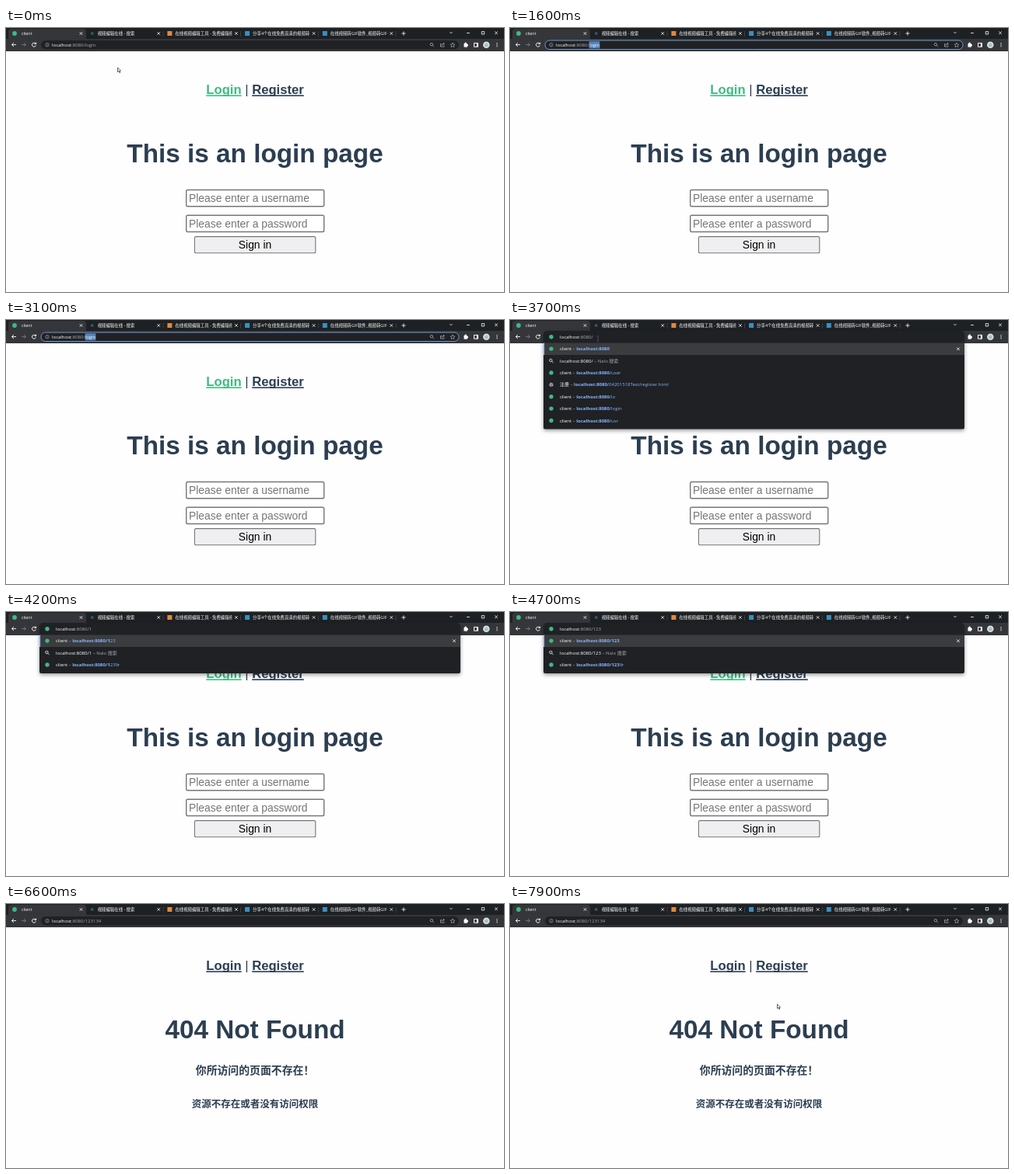
These frames come from a looping animation (640x340 px, 8000 ms). An HTML page with a canvas:

```html
<!DOCTYPE html>
<html lang="en">
<head>
<meta charset="utf-8">
<title>Login page</title>
<style>
  html, body { margin: 0; width: 100%; height: 100%; overflow: hidden; background: #fefefe; }
  canvas { display: block; width: 100vw; height: 100vh; }
</style>
</head>
<body>
<canvas id="stage"></canvas>
<script>
const LOOP = 8000, W = 640, H = 340;
const FOCUS = 1200, SELECT = 1400, OPEN = 3700, ENTER = 6400;
const INK = '#2c3e50', GREEN = '#42b983', BLUE = '#86b6fc', LIGHT = '#fff', GRAY = '#a4aab0';
const BAR = '#35363a', DARK = '#202124';
const UI = '"Open Sans", "Noto Sans CJK SC", sans-serif';
const ARIAL = '"Liberation Sans", Arial, sans-serif';
const CJK = '"Noto Sans CJK SC", sans-serif';
const HOST = 'localhost', PORT = ':8080/';

const canvas = document.getElementById('stage');
const ctx = canvas.getContext('2d');
const ratio = window.devicePixelRatio || 1;
canvas.width = W * ratio;
canvas.height = H * ratio;
ctx.scale(ratio, ratio);

// Draws text and returns the x where it ends.
function text(str, x, y, font, color, align = 'left') {
  ctx.font = font;
  ctx.fillStyle = color;
  ctx.textAlign = align;
  ctx.fillText(str, x, y);
  return x + ctx.measureText(str).width;
}
const ui = (str, x, y, color = LIGHT, bold = false) =>
  text(str, x, y, `${bold ? 'bold ' : ''}6px ${UI}`, color);

function rect(x, y, w, h, color) {
  ctx.fillStyle = color;
  ctx.fillRect(x, y, w, h);
}

function box(x, y, w, h, r, fill, stroke, width = 1) {
  ctx.beginPath();
  ctx.roundRect(x, y, w, h, r);
  if (fill) { ctx.fillStyle = fill; ctx.fill(); }
  if (stroke) { ctx.strokeStyle = stroke; ctx.lineWidth = width; ctx.stroke(); }
}

const disc = (x, y, r, fill, stroke, width = 0.8) =>
  box(x - r, y - r, 2 * r, 2 * r, r, fill, stroke, width);

// Strokes an SVG path placed at x, y.
function icon(d, x, y, color = LIGHT, width = 0.8) {
  ctx.save();
  ctx.translate(x, y);
  ctx.strokeStyle = color;
  ctx.lineWidth = width;
  ctx.stroke(new Path2D(d));
  ctx.restore();
}
const cross = (x, y, r = 1.8) => icon(`M${-r} ${-r}L${r} ${r}M${r} ${-r}L${-r} ${r}`, x, y);

function magnifier(x, y, color = LIGHT) {
  disc(x - 0.6, y - 0.6, 1.7, null, color);
  icon('M.7 .7L2.6 2.6', x, y, color);
}

function globe(x, y) {
  disc(x, y, 2.5, '#b4b8bc');
  icon('M-2 -.8L.5 .4L-.3 2M.5 -2L1.8 0', x, y, DARK, 0.7);
}

const favicons = {
  app: (x, y) => disc(x, y, 2.7, '#41b883'),
  search: magnifier,
  globe
};

function drawTabs() {
  rect(0, 0, W, 14, '#1e2124');
  box(3, 1, 100, 15, [4, 4, 0, 0], BAR);
  const tabs = [
    ['client', '#41b883'],
    ['视频编辑在线 - 搜索', '#35556a'],
    ['在线视频编辑工具 - 免费编辑视频', '#e08a3c'],
    ['分享4个在线免费高清的视频转GIF在', '#3a8fc0'],
    ['在线视频转GIF软件_视频转GIF在线', '#3a8fc0']
  ];
  tabs.forEach(([title, color], i) => {
    const x = 11 + i * 99.7;
    if (i < 2) disc(x, 7, i ? 2 : 2.9, color);
    else rect(x - 3, 4, 6, 6, color);
    ctx.save();
    ctx.beginPath();
    ctx.rect(x + 6, 0, 74, 14);
    ctx.clip();
    text(title, x + (i ? 7 : 9), 9.2, `5.4px ${UI}`, LIGHT);
    ctx.restore();
    cross(x + 85.5, 7);
    if (i) rect(x + 91, 4, 0.6, 7, '#50545a');
  });
  icon('M-2.6 0H2.6M0 -2.6V2.6', 511, 7);
  icon('M-1.6 -.8L0 .8L1.6 -.8', 572, 6);
  icon('M-2 0H2', 594, 6.5);
  icon('M-1.7 -1.7H1.7V1.7H-1.7Z', 613, 6.3);
  cross(630, 6.3);
}

function drawToolbar() {
  rect(0, 14, W, 16, BAR);
  icon('M3 0H-2.6M0 -2.5L-2.6 0L0 2.5', 10, 21.5, LIGHT, 0.9);
  icon('M-3 0H2.6M0 -2.5L2.6 0L0 2.5', 23, 21.5, '#74787c', 0.9);
  icon('M2 -1.4A2.5 2.5 0 1 0 2.4 .9M2.6 -3V-.9H.5', 36, 21.5, LIGHT, 0.9);
  rect(588.5, 20, 4.4, 4.6, LIGHT);
  disc(590.6, 19.7, 1.2, LIGHT);
  disc(593, 22.2, 1.1, LIGHT);
  icon('M-2.5 -2.4H2.5V2.4H-2.5ZM1.3 -2.4V2.4', 604, 21.8, LIGHT, 1);
  disc(617.3, 21.7, 4.3, '#cfdde0');
  disc(617.3, 22, 2.2, '#a9bcb8');
  [-2, 0, 2].forEach(dy => disc(631, 21.7 + dy, 0.65, LIGHT));
}

function drawAddress(path, focused, selected) {
  box(45, 16, 537, 11.5, 5.75, DARK, focused ? '#78a6dd' : null, 0.9);
  disc(53, 21.7, 2.3, null, GRAY, 0.6);
  icon('M0 -.3V1.4M0 -1.4V-.8', 53, 21.7, GRAY, 0.7);
  let x = ui(HOST, 59, 23.8);
  x = ui(PORT, x, 23.8, GRAY);
  if (selected) {
    ctx.font = `6px ${UI}`;
    rect(x, 17.3, ctx.measureText(path).width, 9, '#5684bd');
  }
  ui(path, x, 23.8, selected ? LIGHT : GRAY);
  magnifier(547.5, 21.7, GRAY);
  icon('M-1 -1H-2.5V2.5H2V1M-1 1Q-.5 -1.2 2 -1.2M.8 -2.6L2.4 -1.2L.8 .2', 561, 21.5, GRAY);
  icon('M0 -3L.9 -.9L3 -.8L1.4 .6L1.9 2.7L0 1.5L-1.9 2.7L-1.4 .6L-3 -.8L-.9 -.9Z', 574, 21.9, GRAY, 0.7);
}

// Each row: icon, title, matched part of the address, remainder.
function suggestions(path) {
  const address = HOST + PORT + path;
  const search = ['search', address, '', ''];
  const base = HOST + ':8080';
  if (!path) return [
    ['app', 'client', base, ''],
    search,
    ['app', 'client', base, '/user'],
    ['globe', '注册', base, '/04201518Test/register.html'],
    ['app', 'client', base, '/lo'],
    ['app', 'client', base, '/login'],
    ['app', 'client', base, '/usr']
  ];
  if (path.length > 3) return [['globe', '', address, ''], search];
  return [
    ['app', 'client', address, '123'.slice(path.length)],
    search,
    ['app', 'client', address, '1239r'.slice(path.length)]
  ];
}

function drawDropdown(path) {
  const rows = suggestions(path), step = 15.4, unknown = path.length > 3;
  ctx.save();
  ctx.shadowColor = 'rgba(0,0,0,.4)';
  ctx.shadowBlur = 5 * ratio;
  ctx.shadowOffsetY = 2 * ratio;
  box(43, 14, 541, 18.8 + rows.length * step, [5, 5, 2, 2], DARK);
  ctx.restore();
  rect(43, 29.5, 541, 15.5, '#3a3c3e');
  rect(43, 29.5, 1.2, 15.5, BLUE);
  favicons[unknown ? 'globe' : 'app'](53, 21.7);
  ui(PORT + path, ui(HOST, 64, 23.8), 23.8, GRAY);
  if (!unknown) cross(576, 37.2);
  rows.forEach(([kind, title, match, rest], i) => {
    const y = 37.1 + i * step;
    favicons[kind](53, y);
    let x = ui(title, 64, y + 2.1);
    if (kind === 'search') ui(' – Nalo 搜索', x, y + 2.1, GRAY);
    else {
      if (title) x = ui(' – ', x, y + 2.1, GRAY);
      x = ui(match, x, y + 2.1, BLUE, true);
      ui(rest, x, y + 2.1, BLUE);
    }
  });
}

function drawNav(loginColor) {
  const bold = `bold 16.65px ${ARIAL}`;
  const link = (str, x, color) => {
    const end = text(str, x, 85, bold, color);
    rect(x, 86.3, end - x, 1.6, color);
    return end;
  };
  const x = link('Login', 257.3, loginColor);
  link('Register', text(' | ', x, 85, `16.65px ${ARIAL}`, INK), INK);
}

const heading = str => text(str, 320, 173, `bold 33.3px ${ARIAL}`, INK, 'center');

function drawLogin() {
  const font = `13.87px ${ARIAL}`;
  drawNav(GREEN);
  heading('This is an login page');
  ['username', 'password'].forEach((field, i) => {
    const y = 208.5 + i * 32.7;
    box(231.7, y, 177, 21.3, 1.8, '#fff', '#767676', 1.4);
    text('Please enter a ' + field, 235, y + 15.6, font, '#757575');
  });
  box(242.4, 268.6, 155.4, 21.2, 2, '#efeff1', '#767676', 1.1);
  text('Sign in', 320, 284, font, '#000', 'center');
}

function drawMissing() {
  drawNav(INK);
  heading('404 Not Found');
  text('你所访问的页面不存在！', 320, 218.6, `bold 13.87px ${CJK}`, INK, 'center');
  text('资源不存在或者没有访问权限', 320, 262.2, `bold 12.5px ${CJK}`, INK, 'center');
}

function drawPointer(x, y) {
  ctx.save();
  ctx.translate(x, y);
  const shape = new Path2D('M0 0V5.6L1.4 4.4L2.4 6.6L3.3 6.2L2.3 4.1H4Z');
  ctx.fillStyle = '#fff';
  ctx.fill(shape);
  ctx.strokeStyle = '#222';
  ctx.lineWidth = 0.7;
  ctx.stroke(shape);
  ctx.restore();
}

const beam = (x, y) => icon('M-1 -3H1M0 -3V3M-1 3H1', x, y, '#74787c', 0.5);

// Eased position between two points over a span of time.
function glide(t, start, end, [x0, y0], [x1, y1]) {
  const p = Math.min(1, Math.max(0, (t - start) / (end - start)));
  const k = p * p * (3 - 2 * p);
  return [x0 + (x1 - x0) * k, y0 + (y1 - y0) * k];
}

function drawMouse(t) {
  if (t < FOCUS) {
    const [x, y] = glide(t, 200, 1000, [143.5, 51], [117, 22]);
    (y > 28 ? drawPointer : beam)(x, y);
  } else if (t < 2200) beam(...glide(t, FOCUS, SELECT, [117, 22], [102.5, 22]));
  else if (t < OPEN) beam(...glide(t, 2200, 2800, [102.5, 22], [111.5, 22]));
  else if (t < 4100) beam(113, 24);
  else if (t >= 6800) drawPointer(...glide(t, 6800, 7600, [113, 40], [343.5, 129]));
}

function typed(t) {
  const keyTimes = [4100, 4400, 4700, 5100, 5500, 5800];
  return '123134'.slice(0, keyTimes.filter(k => t >= k).length);
}

function frame(now) {
  const t = Math.floor(now % LOOP / 100) * 100;
  const editing = t >= OPEN && t < ENTER, missing = t >= ENTER;
  rect(0, 0, W, H, '#fefefe');
  (missing ? drawMissing : drawLogin)();
  drawTabs();
  drawToolbar();
  if (editing) drawDropdown(typed(t));
  else drawAddress(missing ? typed(t) : 'login', t >= FOCUS && !missing, t >= SELECT && !missing);
  drawMouse(t);
  requestAnimationFrame(frame);
}
requestAnimationFrame(frame);
</script>
</body>
</html>
```
